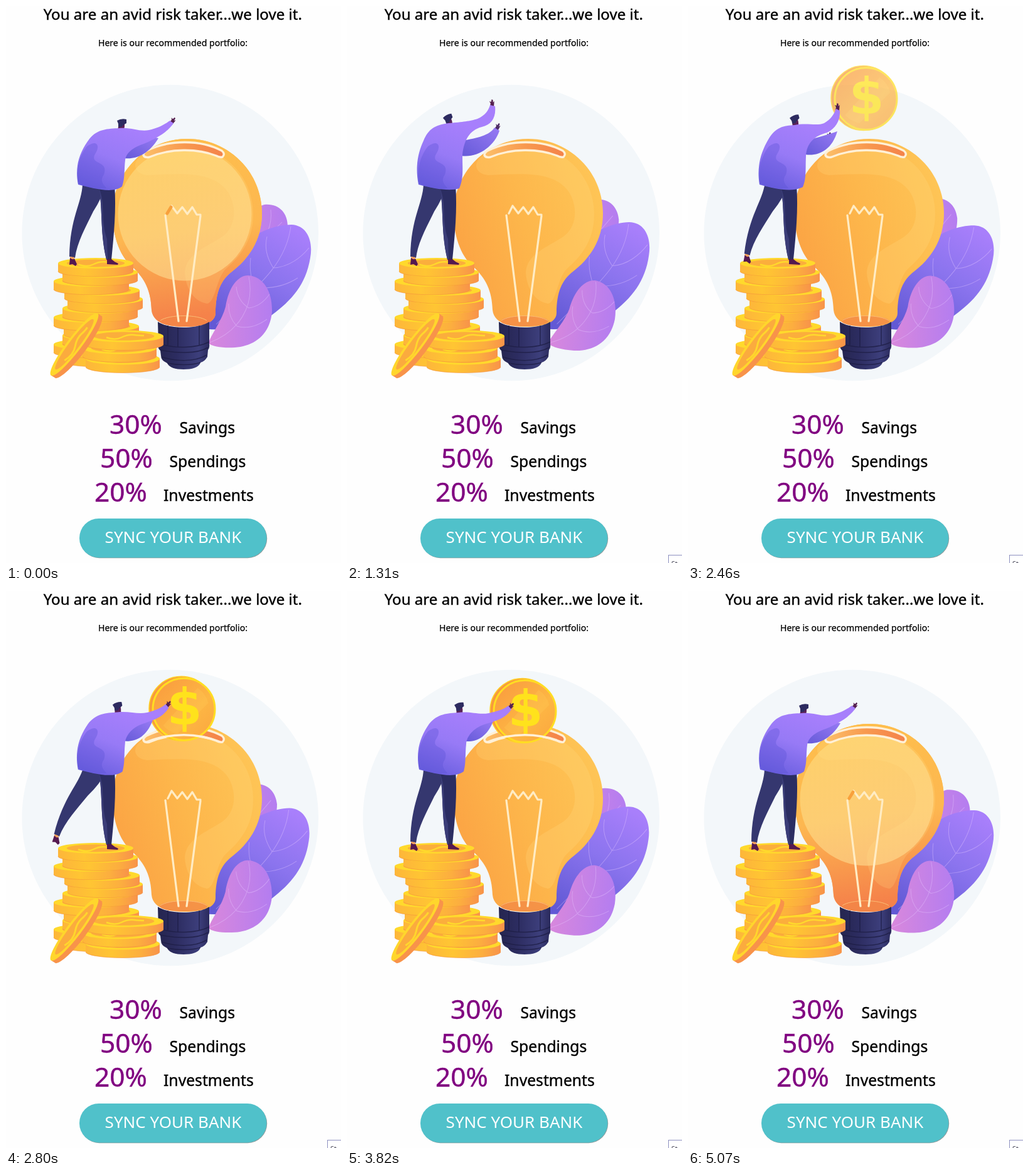
An HTML page for the animation above (5170 ms loop, 534 by 889 pixels).

```html
<!DOCTYPE html>
<html lang="en">
<head>
<meta charset="utf-8">
<title>Portfolio</title>
<style>
  html, body { margin: 0; width: 100%; height: 100%; overflow: hidden; background: #fefefe; }
  svg { display: block; width: 100vw; height: 100vh; }
  text { font-family: "Noto Sans", "Open Sans", sans-serif; }
  .bold { stroke: currentColor; stroke-width: .4; }
  .percent { font-size: 42.5px; fill: #800080; color: #800080; }
  .label { font-size: 24.7px; }
  .vein { fill: none; stroke: #e6c9ff; stroke-opacity: .4; stroke-width: 1; }
  .wire { fill: none; stroke: #ffecc4; stroke-width: 3.2; stroke-linecap: round; stroke-linejoin: round; }
</style>
</head>
<body>
<svg viewBox="0 0 534 889">
  <defs>
    <linearGradient id="bulbFill" x1="0" y1=".75" x2="1" y2=".3">
      <stop offset="0" stop-color="#fba143"/><stop offset=".5" stop-color="#fdb64b"/><stop offset="1" stop-color="#fec556"/>
    </linearGradient>
    <linearGradient id="litFill" x1=".4" y1="0" x2=".5" y2="1">
      <stop offset="0" stop-color="#febe4c"/><stop offset=".5" stop-color="#fdb750"/><stop offset=".95" stop-color="#f5824a"/>
    </linearGradient>
    <linearGradient id="glowFill" x1=".2" y1="0" x2=".8" y2="1">
      <stop offset="0" stop-color="#fddc80" stop-opacity=".6"/><stop offset="1" stop-color="#fdd890" stop-opacity=".65"/>
    </linearGradient>
    <linearGradient id="slotFill">
      <stop offset="0" stop-color="#fcc069"/><stop offset=".5" stop-color="#f8994f"/><stop offset="1" stop-color="#f4824a"/>
    </linearGradient>
    <linearGradient id="baseFill">
      <stop offset="0" stop-color="#25254f"/><stop offset=".35" stop-color="#2c2c60"/><stop offset=".8" stop-color="#3d3f7c"/><stop offset="1" stop-color="#2a2a5c"/>
    </linearGradient>
    <linearGradient id="sideFill">
      <stop offset="0" stop-color="#fdb63a"/><stop offset=".35" stop-color="#ffc533"/><stop offset=".75" stop-color="#fcae3f"/><stop offset="1" stop-color="#f8934a"/>
    </linearGradient>
    <linearGradient id="coinFill" x1="0" y1="0" x2="1" y2="1">
      <stop offset="0" stop-color="#f9993e"/><stop offset=".6" stop-color="#fdb644"/><stop offset="1" stop-color="#fba63f"/>
    </linearGradient>
    <linearGradient id="shirtFill" gradientUnits="userSpaceOnUse" x1="190" y1="190" x2="150" y2="295">
      <stop offset="0" stop-color="#a77ffc"/><stop offset=".5" stop-color="#977af6"/><stop offset="1" stop-color="#6c60e0"/>
    </linearGradient>
    <linearGradient id="sleeveFill" x1="1" y1="0" x2="0" y2="1">
      <stop offset="0" stop-color="#977af4"/><stop offset="1" stop-color="#655ad8"/>
    </linearGradient>
    <linearGradient id="leafFill" gradientUnits="userSpaceOnUse" x1="450" y1="350" x2="350" y2="515">
      <stop offset="0" stop-color="#a87ffb"/><stop offset=".45" stop-color="#8b74ee"/><stop offset="1" stop-color="#6259d5"/>
    </linearGradient>
    <linearGradient id="pinkFill">
      <stop offset="0" stop-color="#d988dc"/><stop offset="1" stop-color="#b47df0"/>
    </linearGradient>
    <path id="bulbShape" d="M289 212C355 212 408 265 408 331C408 375 385 405 360 424C343 437 334 456 334 490C334 505 315 512 285 512C255 512 234 505 232 485C231 455 222 435 200 415C180 397 170 365 170 331C170 265 223 212 289 212Z"/>
    <path id="palm" d="M-3 1L-2 -5L-4 -8L-1 -7L0 -11L2 -10L2 -6L4 -8L3 1Z"/>
  </defs>

  <g text-anchor="middle">
    <text class="bold" x="265.8" y="22" font-size="24.1">You are an avid risk taker...we love it.</text>
    <text class="bold" x="266" y="64" font-size="14.1" style="stroke-width:.25">Here is our recommended portfolio:</text>
  </g>

  <circle cx="261.7" cy="362" r="236.3" fill="#f3f7fa"/>

  <g id="backLeaf">
    <path fill="url(#pinkFill)" d="M330 510C350 450 375 325 412 317C435 315 449 330 449 352C445 400 380 480 330 510Z"/>
    <path class="vein" d="M395 400C415 370 425 350 422 325M412 372L440 345"/>
  </g>
  <g id="bigLeaf">
    <path fill="url(#leafFill)" d="M315 515C305 470 335 395 380 378C402 360 430 349 455 349C480 350 490 375 485 402C478 445 455 470 424 493C400 510 350 520 315 515Z"/>
    <path class="vein" d="M335 508C390 455 445 420 454 352M426 418C415 400 412 385 416 368M426 418C450 417 470 402 483 386M395 449C390 430 388 420 390 402M395 449C420 452 445 447 465 434"/>
  </g>
  <g id="frontLeaf">
    <path fill="url(#pinkFill)" d="M322 538C330 520 345 500 350 480C355 448 370 430 386 430C412 432 425 458 424 488C421 525 395 543 365 545C345 546 330 544 322 538Z"/>
    <path class="vein" d="M325 537C370 520 397 480 387 432M387 482C375 475 368 462 367 448M387 482C402 480 413 470 420 460M368 511C360 503 354 490 355 475M368 511C385 516 402 510 416 500"/>
  </g>

  <g id="bulb">
    <use href="#bulbShape" fill="url(#bulbFill)"/>
    <g id="light">
      <use href="#bulbShape" fill="url(#litFill)"/>
      <circle cx="285" cy="332" r="106.5" fill="url(#glowFill)"/>
    </g>
    <path fill="#ffe08a" opacity=".2" d="M206 256C205 235 245 224 289 224C350 225 394 275 394 332C394 378 370 402 350 420C335 435 334 474 320 475C295 470 286 445 285 425C287 395 320 385 345 368C370 350 367 312 350 292C325 262 270 268 225 270Q208 268 206 256Z"/>
    <ellipse cx="283" cy="503" rx="38" ry="8.5" fill="#f28746" opacity=".7"/>
    <path fill="none" stroke="#fcbd75" stroke-width="1" d="M246 502C260 492 306 492 320 502"/>
    <path class="wire" d="M254 334L275 503M310 335L288 503M258 331L264 319L273 331L281 321L289 332L297 321L304 333L310 333"/>
    <path id="spark" d="M257 331L263 321" stroke="#f8a03c" stroke-width="5" stroke-linecap="round"/>
    <path fill="url(#baseFill)" d="M242 504C260 516 306 516 324 504L324 540Q325 545 322 549L321 560Q316 568 310 569C308 577 296 580 283 580C270 580 260 577 257 570Q247 566 247 558L246 550Q241 546 243 539Z"/>
    <path fill="none" stroke="#1c1c43" stroke-width="1.5" opacity=".75" d="M243 538C268 548 305 546 324 536M246 549C270 554 304 556 322 545M248 560C270 567 300 569 320 557M257 570C272 573 295 574 310 569M258 510L258 541M274 513L274 544M308 510L308 541"/>
    <path fill="url(#slotFill)" stroke="#fff0d6" stroke-width="3.4" d="M224 231C260 213 310 213 344 231Q350 236 345 241Q340 242 335 239C305 227 262 227 229 241Q221 243 219 238Q219 234 224 231Z"/>
  </g>

  <g id="coin">
    <g id="coinFace">
      <circle cx="-4" cy="-1" r="51.5" fill="#f89a3d" stroke="#ffd428" stroke-width="1.5"/>
      <circle r="49.5" fill="url(#coinFill)"/>
      <path d="M-33 26L22 -34A41 41 0 0 1 39 -10L-10 39Q-24 36 -33 26Z" fill="#ffc95a" opacity=".25"/>
    </g>
    <circle r="49.5" fill="none" stroke="#ffdd22" stroke-width="3"/>
    <text x="1" y="24" text-anchor="middle" font-size="80" font-weight="700" fill="#ffe21c" style="font-family:'DejaVu Sans',sans-serif">$</text>
  </g>
  <path id="slotFront" fill="none" stroke="#fff0d6" stroke-width="3.4" d="M224 241C262 226 305 226 342 241"/>

  <g id="stack"></g>

  <g id="man">
    <g id="backLeg">
      <path fill="#35376f" d="M122 284C121 315 102 337 101 400L110 402C113 377 128 351 139 328Q154 305 158 285Z"/>
      <path fill="#f8a05a" d="M102 400L109 401L108 406L102 405Z"/>
      <path fill="#55194f" d="M102 402Q107 406 109 403L113 412L111 415L106 412L101 413Z"/>
    </g>
    <path fill="#2b2d62" d="M147 285C155 320 149 355 160 405L168 405C172 365 176 325 173 285Z"/>
    <path fill="#3b3d78" d="M148 290C159 315 150 340 161 372L162 404L160 404C149 360 155 320 147 285Z"/>
    <path fill="#55194f" d="M161 404L168 404Q173 409 179 411L178 413L161 412Z"/>
    <use id="rearHand" href="#palm" fill="#4d2c66"/>
    <path id="rear" fill="url(#sleeveFill)"/>
    <g id="head">
      <path fill="#5a2257" d="M-5 2L-3 -8L6 -9L6 -4L5 2Z"/>
      <path fill="#2d2b60" d="M-4 -3L-4 -8L-6 -13Q1 -17 9 -15L9 -9L4 -6L1 -3Z"/>
    </g>
    <use id="hand" href="#palm" fill="#55204f"/>
    <path id="body" fill="url(#shirtFill)"/>
    <path fill="#5a50d4" opacity=".35" d="M115 283C111 258 118 238 129 224C146 212 151 224 141 238C135 254 164 246 156 269C147 282 160 288 160 291C145 292 130 291 115 283Z"/>
  </g>

  <g>
    <text class="percent bold" x="165" y="683">30%</text><text class="label bold" x="276.5" y="682">Savings</text>
    <text class="percent bold" x="150" y="737">50%</text><text class="label bold" x="260.5" y="736">Spendings</text>
    <text class="percent bold" x="141" y="791">20%</text><text class="label bold" x="251" y="790">Investments</text>
  </g>
  <rect x="117.8" y="818.8" width="298.4" height="62.4" rx="31" fill="#8b9a9b"/>
  <rect x="117" y="818" width="298.4" height="62.4" rx="31" fill="#50c1ca"/>
  <text x="266.5" y="857" text-anchor="middle" font-size="26" fill="#fff">SYNC YOUR BANK</text>

  <g id="tooltip">
    <rect x="512.5" y="876.5" width="40" height="24" fill="#fff" stroke="#8d90c0"/>
    <text x="517" y="894" font-size="11" fill="#445">St</text>
  </g>
</svg>
<script>
const LOOP = 5170;
const $ = id => document.getElementById(id);

// Coin stacks, drawn from the bottom up
const flatCoin = (cx, y, rx, ry = 8.5, h = 13) => `
  <path fill="url(#sideFill)" d="M${cx - rx} ${y}v${h}a${rx} ${ry} 0 0 0 ${2 * rx} 0v${-h}z"/>
  <path fill="none" stroke="#f3903f" stroke-width="1" opacity=".6" d="M${cx - rx} ${y + h}a${rx} ${ry} 0 0 0 ${2 * rx} 0"/>
  <ellipse cx="${cx}" cy="${y}" rx="${rx}" ry="${ry}" fill="#ffd92c"/>
  <ellipse cx="${cx}" cy="${y}" rx="${rx * .77}" ry="${ry * .7}" fill="#fbae3c"/>
  <path fill="none" stroke="#ffd92c" stroke-width="2.5" d="M${cx - 28} ${y + 2}q14 5 24 0t20 -4t16 1"/>`;
const lefts = [83, 90, 76, 93, 98, 90, 76, 92, 90, 76, 90];
const tall = lefts.map((x, i) => flatCoin(x + 60, 410.5 + 14.4 * i, 60)).reverse();
const low = [[186, 563, 59], [181, 546, 59], [188, 527, 63]].map(([x, y, rx]) => flatCoin(x, y, rx, 9.5));
$('stack').innerHTML = tall.join('') + low.join('') + `
  <g transform="translate(109 540) rotate(-53)">
    <path fill="#f8934a" d="M-62 0L-61 9A62 13 0 0 0 62 8L62 0Z"/>
    <ellipse rx="62" ry="11.5" fill="#ffd62c"/>
    <ellipse rx="50" ry="8" fill="#fbab3e"/>
    <path fill="none" stroke="#ffd62c" stroke-width="3" d="M-30 3q16 6 28 0t22 -4t14 1"/>
  </g>`;

const lean = {
  body: 'M115 285C109 255 118 232 133 212C146 196 162 196 181 195C200 193 212 201 228 198C242 195 252 190 261 183L267 187C258 201 240 211 222 219C205 225 192 232 190 246C188 262 190 274 185 288C170 300 140 291 115 285Z',
  rear: 'M189 243C207 245 227 237 243 211C225 206 205 212 188 222Z',
  head: 'translate(183 196) rotate(0)', hand: 'translate(263 187) rotate(32)', rearHand: 'translate(230 213) rotate(20)'
};
const raised = {
  body: 'M114 285C108 255 114 232 122 215C130 196 140 190 162 187C185 185 196 184 208 180C220 175 226 166 228 158L236 160C238 178 230 190 215 193C195 198 186 215 184 238C184 262 186 274 179 291C165 296 140 292 114 285Z',
  rear: 'M182 239C208 243 235 224 243 199L235 194C228 206 208 211 183 215Z',
  head: 'translate(163 189) rotate(-20)', hand: 'translate(231 160) rotate(-2)', rearHand: 'translate(238 197) rotate(22)'
};
const reach = {
  body: 'M114 285C109 255 117 232 128 213C140 193 152 191 170 190C190 186 205 192 217 187C228 181 233 172 236 164L242 167C243 182 236 195 222 202C202 207 189 218 188 240C187 262 189 274 183 289C165 298 140 292 114 285Z',
  rear: 'M187 237C207 240 229 231 238 200C228 204 207 209 187 216Z',
  head: 'translate(171 190) rotate(-14)', hand: 'translate(238 166) rotate(-2)', rearHand: 'translate(224 212) rotate(10)'
};
const push = {
  body: 'M115 285C109 255 117 232 131 212C144 196 160 195 178 194C198 192 210 198 226 195C240 192 250 189 257 183L262 189C253 203 238 207 222 212C204 217 191 230 190 244C188 262 190 274 186 288C170 300 140 291 115 285Z',
  rear: 'M189 240C207 241 223 233 233 208C222 205 205 210 188 221Z',
  head: 'translate(179 194) rotate(-9)', hand: 'translate(258 187) rotate(40)', rearHand: 'translate(222 213) rotate(20)'
};
const letGo = {
  body: 'M115 285C109 255 118 232 134 212C147 197 164 197 185 196C203 195 216 201 234 199C248 198 258 196 267 191L270 198C260 206 244 210 224 215C205 221 192 232 190 246C188 262 190 274 186 288C170 300 140 291 115 285Z',
  rear: 'M189 242C207 244 224 236 234 210C222 208 205 212 188 222Z',
  head: 'translate(187 197) rotate(2)', hand: 'translate(267 195) rotate(52)', rearHand: 'translate(223 214) rotate(20)'
};
const poses = [[0, lean], [1050, raised], [1750, raised], [2460, reach], [2900, push], [3850, push], [4500, letGo], [5080, lean]];

// Blends two strings of the same shape, number by number
const mix = (a, b, k) => {
  const ends = b.match(/-?[\d.]+/g);
  let i = 0;
  return a.replace(/-?[\d.]+/g, n => (+n + (ends[i++] - n) * k).toFixed(2));
};
const smooth = k => k * k * (3 - 2 * k);
const linear = k => k;

function segment(keys, t) {
  let i = keys.findIndex(key => key[0] > t);
  if (i < 0) i = keys.length;
  const from = keys[Math.max(i - 1, 0)], to = keys[Math.min(i, keys.length - 1)];
  return [from[1], to[1], to === from ? 0 : (t - from[0]) / (to[0] - from[0])];
}
function track(keys, t, ease = smooth) {
  const [a, b, k] = segment(keys, t);
  return a + (b - a) * ease(k);
}

const legSwing = [[2050, 0], [2460, 6], [2870, 14], [3280, 8.4], [3720, 0]];
const coinY = [[2300, 126], [2460, 148], [2870, 192], [3890, 192], [4520, 261], [4850, 290]];
const coinAlpha = [[2270, 0], [2460, .72], [2620, 1], [4450, 1], [4540, .85], [4820, 0]];
const faceAlpha = [[3890, 1], [4480, .25]];
const glow = [[100, 1], [680, 0], [4600, 0], [5020, 1]];

// Leaf sway in degrees, zero at the start of the loop
const sway = (t, size, peak, period) => {
  const wave = time => Math.cos((time - peak) / period * 2 * Math.PI);
  return size * (wave(t) - wave(0));
};
const turn = (id, angle, x, y) => $(id).setAttribute('transform', `rotate(${angle} ${x} ${y})`);
const fade = (id, alpha) => $(id).setAttribute('opacity', alpha);

function draw(t) {
  turn('bigLeaf', sway(t, 2.2, 2115, LOOP / 2), 320, 520);
  turn('frontLeaf', sway(t, 3.5, 1450, LOOP / 2), 320, 520);
  turn('backLeaf', sway(t, 3.7, 4700, LOOP), 320, 520);
  turn('backLeg', track(legSwing, t), 140, 290);

  const [a, b, k] = segment(poses, t);
  for (const part in lean) {
    const attribute = part === 'body' || part === 'rear' ? 'd' : 'transform';
    $(part).setAttribute(attribute, mix(a[part], b[part], smooth(k)));
  }

  const alpha = track(coinAlpha, t, linear);
  $('coin').setAttribute('transform', `translate(283.5 ${track(coinY, t)})`);
  fade('coin', alpha);
  fade('coinFace', track(faceAlpha, t, linear));
  fade('slotFront', t > 2700 && alpha > 0 ? 1 : 0);

  const light = track(glow, t);
  fade('light', light);
  fade('spark', light);
  $('tooltip').setAttribute('visibility', t >= 870 ? 'visible' : 'hidden');
}

function tick() {
  draw(performance.now() % LOOP);
  requestAnimationFrame(tick);
}
tick();
</script>
</body>
</html>
```
